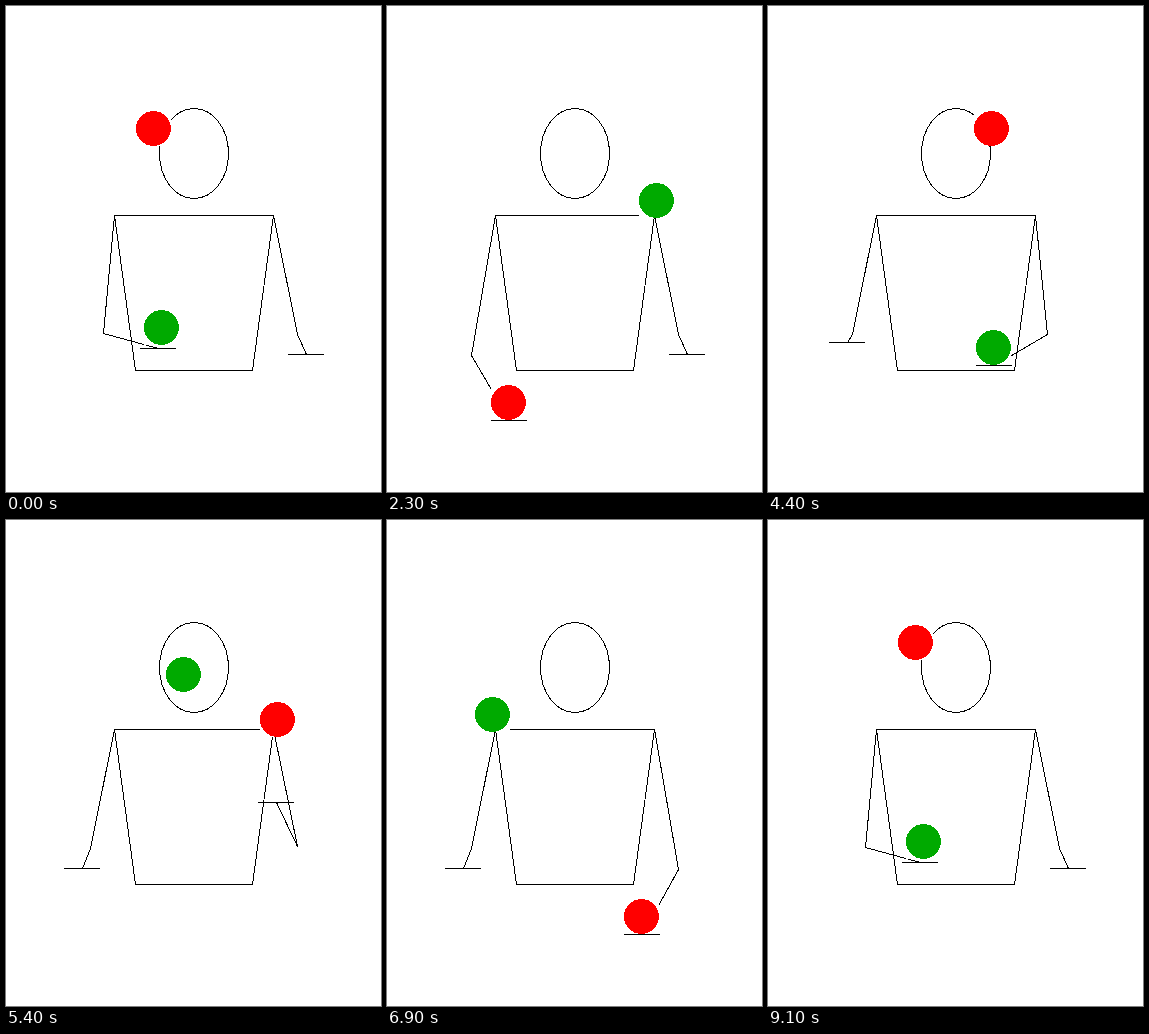
Recreate the animation shown at these times as an HTML page. Size 375x486 px, loop 9.2 s.

```html
<!DOCTYPE html>
<html lang="en">
<head>
<meta charset="utf-8">
<title>Two-ball juggler</title>
<style>
  html, body { margin: 0; width: 100%; height: 100%; overflow: hidden; background: #fff; }
  svg { display: block; width: 375px; height: 486px; }
  .ink { fill: none; stroke: #000; stroke-width: 1; stroke-linecap: square; }
</style>
</head>
<body>
<svg viewBox="0 0 375 486" shape-rendering="crispEdges">
  <ellipse class="ink" cx="188" cy="147.5" rx="34.5" ry="45"/>
  <path class="ink" d="M108.5 209.5H267.5L246.5 364.5H129.5Z"/>
  <path class="ink" id="leftArm"/>
  <path class="ink" id="rightArm"/>
  <g id="red"><rect width="35" height="35" fill="#fff"/><circle cx="17.5" cy="17.5" r="17.5" fill="#f00"/></g>
  <g id="green"><rect width="35" height="35" fill="#fff"/><circle cx="17.5" cy="17.5" r="17.5" fill="#0a0"/></g>
</svg>
<script>
const STEP = 100, STEPS = 92, BEAT = STEPS / 6;
const CATCH_X = 58.57, THROW_X = 136.57, MIRROR = 341.55, HAND_Y = 348.45;
const SIZE = 35, FLIGHT = 208, DIP = 68.2, LIFT = 69.2;

const el = id => document.getElementById(id);
const mix = (a, b, s) => a + (b - a) * s;
const arc = s => 4 * s * (1 - s);
const mod = (a, n) => ((a % n) + n) % n;

const carry = s => ({ x: mix(CATCH_X, THROW_X, s), y: HAND_Y + DIP * arc(s) });
const back = s => ({ x: mix(THROW_X, CATCH_X, s), y: HAND_Y - LIFT * arc(s) });

// Left hand over six beats: carry, back, wait, wait, carry, back
function hand(beat) {
  const i = Math.floor(beat), s = beat - i;
  if (i === 2 || i === 3) return { x: CATCH_X, y: HAND_Y };
  return i % 4 === 0 ? carry(s) : back(s);
}

// Each ball is carried for one beat, then flies across for two
function ball(beat) {
  const r = beat % 3;
  let p;
  if (r < 1) {
    p = carry(r);
  } else {
    const s = (r - 1) / 2;
    p = { x: mix(THROW_X, MIRROR - CATCH_X, s), y: HAND_Y - FLIGHT * arc(s) };
  }
  return { x: beat < 3 ? p.x : MIRROR - p.x, y: p.y - SIZE };
}

function drawArm(node, h, right) {
  const u = h.x - CATCH_X, v = h.y - HAND_Y;
  const ex = Math.round(84 + Math.max(0, (u - 50) / 2));
  const ey = Math.round(328 + (v > 0 ? v * v * 0.005 : v * 0.03) - u * 0.015);
  const flip = x => (right ? 375 - x : x) + 0.5;
  const x = Math.floor(right ? MIRROR - h.x : h.x), y = Math.floor(h.y) + 0.5;
  node.setAttribute("d",
    `M${flip(108)} 209.5L${flip(ex)} ${ey + 0.5}L${x + 18.5} ${y}M${x + 0.5} ${y}H${x + 35.5}`);
}

function drawBall(node, p) {
  node.setAttribute("transform", `translate(${Math.floor(p.x)} ${Math.floor(p.y)})`);
}

function draw(ms) {
  // The loop opens on its closing pose
  const step = Math.floor(mod(ms, STEP * STEPS) / STEP) || STEPS - 1;
  const beat = mod(step - 14, STEPS) / BEAT;
  drawArm(el("leftArm"), hand(beat), false);
  drawArm(el("rightArm"), hand(mod(beat + 3, 6)), true);
  drawBall(el("red"), ball(beat));
  drawBall(el("green"), ball(mod(beat + 2, 6)));
}

const start = performance.now();
function tick() {
  draw(performance.now() - start);
  requestAnimationFrame(tick);
}
tick();
</script>
</body>
</html>
```
